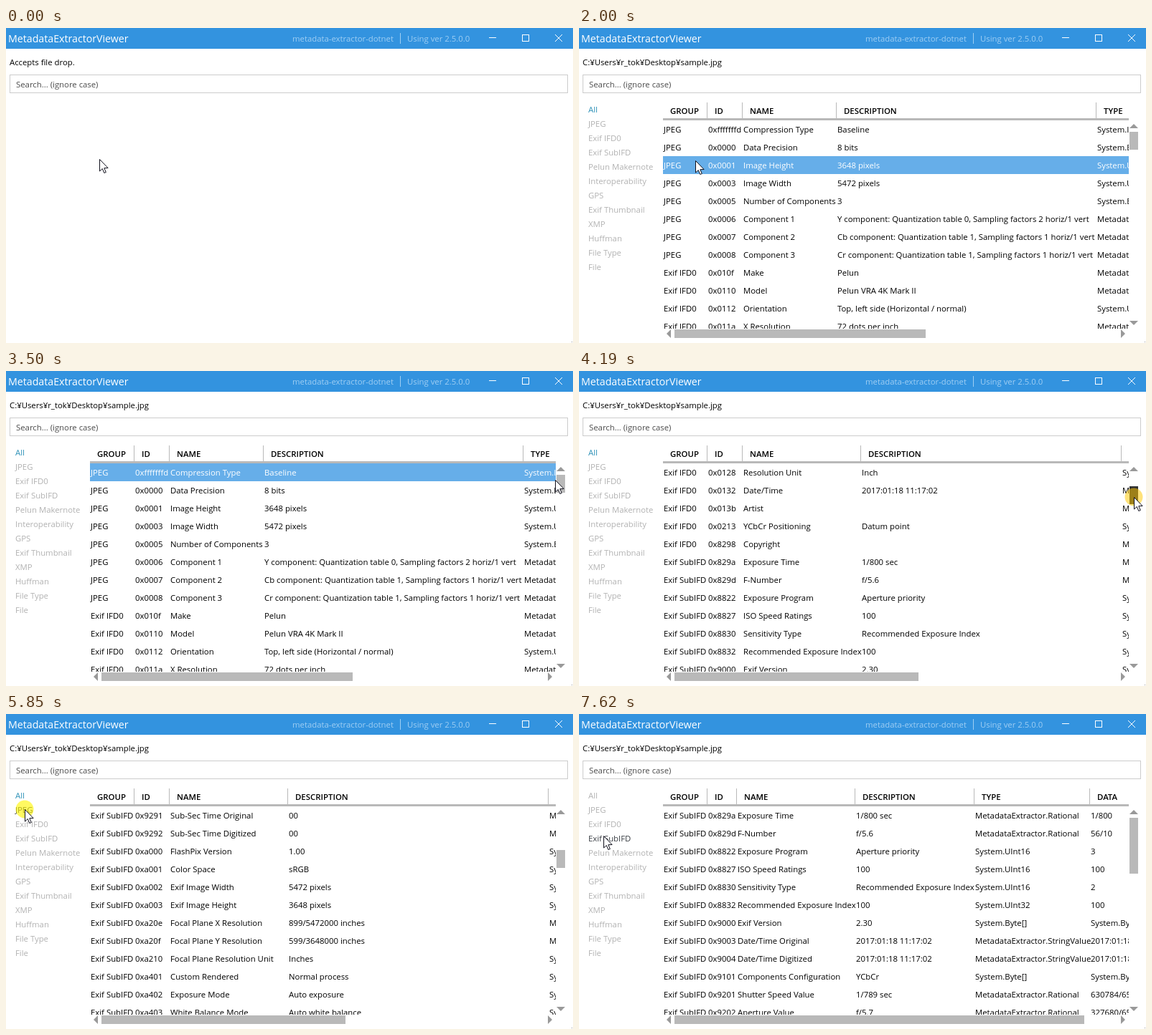
An HTML page with a canvas that plays this animation: 790 px wide and 440 px high, repeating every 8 s.

```html
<!DOCTYPE html>
<html lang="en">
<head>
<meta charset="utf-8">
<title>MetadataExtractorViewer</title>
<style>
html, body { margin: 0; width: 100%; height: 100%; overflow: hidden; background: #fff; }
canvas { display: block; }
</style>
</head>
<body>
<canvas id="stage" width="790" height="440"></canvas>
<script>
const ctx = document.getElementById('stage').getContext('2d', { alpha: false });
const LOOP = 8000;
const FAMILY = '"Open Sans", "Noto Sans", sans-serif';
const BODY = '11.35px ' + FAMILY;
const HEAD = '600 11.4px ' + FAMILY;
const TITLE = '14.2px ' + FAMILY;
const INK = '#000', GREY = '#b9b9b9', ACCENT = '#3393df';
const LEFT = 117, TOP = 129, BOTTOM = 420, ROW = 25;

const TABS = ['All', 'JPEG', 'Exif IFD0', 'Exif SubIFD', 'Pelun Makernote', 'Interoperability',
  'GPS', 'Exif Thumbnail', 'XMP', 'Huffman', 'File Type', 'File'];
const HEADERS = ['GROUP', 'ID', 'NAME', 'DESCRIPTION', 'TYPE', 'DATA'];
const TYPES = {
  i: 'System.Int32', b: 'System.Byte', u: 'System.UInt16', l: 'System.UInt32', a: 'System.Byte[]',
  r: 'MetadataExtractor.Rational', s: 'MetadataExtractor.StringValue',
  c: 'MetadataExtractor.Formats.Jpeg.JpegComponent'
};

// id | name | description | type key | data (falls back to the type, then the description)
const parse = (group, text) => text.trim().split('\n').map(line => {
  const [id, name, description, key, data] = line.split('|');
  const type = TYPES[key];
  return [group, '0x' + id, name, description, type, data || (key === 'a' ? type : description)];
});

const jpeg = parse('JPEG', `
fffffffd|Compression Type|Baseline|i|0
0000|Data Precision|8 bits|b|8
0001|Image Height|3648 pixels|u|3648
0003|Image Width|5472 pixels|u|5472
0005|Number of Components|3|b
0006|Component 1|Y component: Quantization table 0, Sampling factors 2 horiz/1 vert|c
0007|Component 2|Cb component: Quantization table 1, Sampling factors 1 horiz/1 vert|c
0008|Component 3|Cr component: Quantization table 1, Sampling factors 1 horiz/1 vert|c`);

const ifd0 = parse('Exif IFD0', `
010f|Make|Pelun|s
0110|Model|Pelun VRA 4K Mark II|s
0112|Orientation|Top, left side (Horizontal / normal)|u|1
011a|X Resolution|72 dots per inch|r|72/1
011b|Y Resolution|72 dots per inch|r|72/1
0128|Resolution Unit|Inch|u|2
0132|Date/Time|2017:01:18 11:17:02|s
013b|Artist||s
0213|YCbCr Positioning|Datum point|u|2
8298|Copyright||s`);

const subIfd = parse('Exif SubIFD', `
829a|Exposure Time|1/800 sec|r|1/800
829d|F-Number|f/5.6|r|56/10
8822|Exposure Program|Aperture priority|u|3
8827|ISO Speed Ratings|100|u
8830|Sensitivity Type|Recommended Exposure Index|u|2
8832|Recommended Exposure Index|100|l
9000|Exif Version|2.30|a
9003|Date/Time Original|2017:01:18 11:17:02|s
9004|Date/Time Digitized|2017:01:18 11:17:02|s
9101|Components Configuration|YCbCr|a
9201|Shutter Speed Value|1/789 sec|r|630784/65536
9202|Aperture Value|f/5.7|r|327680/65536
9204|Exposure Bias Value|0 EV|r|0/1
9207|Metering Mode|Multi-segment|u|5
9209|Flash|Flash did not fire|u|16
920a|Focal Length|18 mm|r|18/1
9286|User Comment||a
9290|Sub-Sec Time|00|s
9291|Sub-Sec Time Original|00|s
9292|Sub-Sec Time Digitized|00|s
a000|FlashPix Version|1.00|a
a001|Color Space|sRGB|u|1
a002|Exif Image Width|5472 pixels|u|5472
a003|Exif Image Height|3648 pixels|u|3648
a20e|Focal Plane X Resolution|899/5472000 inches|r
a20f|Focal Plane Y Resolution|599/3648000 inches|r
a210|Focal Plane Resolution Unit|Inches|u|2
a401|Custom Rendered|Normal process|u|0
a402|Exposure Mode|Auto exposure|u|0
a403|White Balance Mode|Auto white balance|u|0
a406|Scene Capture Type|Standard|u|0`);

const all = [...jpeg, ...ifd0, ...subIfd];

// seps: column edges; extent: full table width; thumb: vertical thumb height
const VIEWS = {
  all: { tab: 0, rows: all, seps: [178, 227, 358, 720], extent: 1150, thumb: 25 },
  allWide: { tab: 0, rows: all, seps: [178, 227, 392, 755], extent: 1184, thumb: 25 },
  jpeg: { tab: 1, rows: jpeg, seps: [178, 227, 358, 720], extent: 1150 },
  ifd0: { tab: 2, rows: ifd0, seps: [178, 219, 320, 503, 664], extent: 655 },
  subIfd: { tab: 3, rows: subIfd, seps: [178, 219, 384, 550, 711], extent: 705, thumb: 78 }
};

// The screen is refreshed in bursts: [first, last, count]
const BURSTS = [[0, 0, 1], [70, 130, 2], [790, 790, 1], [990, 1130, 3], [1330, 1330, 1], [1790, 2000, 4],
  [2460, 3220, 11], [3290, 4050, 11], [4120, 4910, 12], [4980, 5670, 11], [5850, 5920, 2],
  [6250, 6660, 6], [7070, 7620, 7]];
const TICKS = BURSTS.flatMap(([first, last, count]) =>
  Array.from({ length: count }, (_, i) => first + (count > 1 ? (last - first) * i / (count - 1) : 0)));

// Pointer path: time, x, y
const PATH = [[0, 130, 183], [70, 57, 217], [130, 20, 238], [990, 20, 238], [1060, 95, 200], [1130, 153, 171],
  [1330, 166, 187], [1789, 166, 187], [1790, 162, 185], [2400, 162, 185], [2840, 237, 312], [3220, 700, 168],
  [3290, 738, 153], [3440, 765, 152], [3660, 773, 159], [3760, 773, 159], [4620, 773, 199], [4900, 773, 204],
  [4920, 773, 204], [5660, 26, 133], [6180, 26, 133], [6410, 29, 152], [7000, 29, 152], [7340, 34, 170],
  [LOOP, 34, 170]];

const within = (t, a, b) => t >= a && t < b;

function pointerAt(t) {
  const i = Math.max(1, PATH.findIndex(p => p[0] >= t));
  const [t0, x0, y0] = PATH[i - 1], [t1, x1, y1] = PATH[i];
  const k = (t - t0) / (t1 - t0);
  return { x: Math.round(x0 + (x1 - x0) * k), y: Math.round(y0 + (y1 - y0) * k) };
}

function viewAt(t, scroll) {
  if (t < 1855) return null;
  if (t < 5915) return scroll >= 13 ? VIEWS.allWide : VIEWS.all;
  if (t < 6575) return VIEWS.jpeg;
  return t < 7525 ? VIEWS.ifd0 : VIEWS.subIfd;
}

function box(x, y, w, h, color) {
  ctx.fillStyle = color;
  ctx.fillRect(x, y, w, h);
}

function text(value, x, y, color = INK, font = BODY) {
  ctx.font = font;
  ctx.fillStyle = color;
  ctx.fillText(value, x, y);
}

function shape(points, fill, stroke) {
  ctx.beginPath();
  points.forEach(([x, y]) => ctx.lineTo(x, y));
  ctx.closePath();
  ctx.fillStyle = fill;
  ctx.fill();
  if (stroke) {
    ctx.strokeStyle = stroke;
    ctx.stroke();
  }
}

function drawTitleBar(active) {
  box(0, 0, 790, 29, active ? ACCENT : '#808080');
  text('MetadataExtractorViewer', 3, 20, '#fff', TITLE);
  const dim = active ? '#9fcef3' : '#c4c4c4';
  text('metadata-extractor-dotnet', 399, 19, dim);
  box(549, 7, 1, 15, dim);
  text('Using ver 2.5.0.0', 559, 19, dim);
  box(673, 13, 10, 1, '#fff');
  ctx.strokeStyle = '#fff';
  ctx.strokeRect(719.5, 9.5, 9, 9);
  ctx.beginPath();
  ctx.moveTo(765, 9);
  ctx.lineTo(775, 19);
  ctx.moveTo(775, 9);
  ctx.lineTo(765, 19);
  ctx.stroke();
}

function drawTabs(selected, pointer) {
  TABS.forEach((name, i) => {
    const hover = pointer.x < 112 && Math.floor((pointer.y - 104) / 20) === i;
    text(name, 13, 118 + 20 * i, hover ? '#3c4046' : i === selected ? '#2f92b8' : '#b2b2b2');
  });
}

function drawScrollBars(view, right, scroll, pressed) {
  const arrow = '#999';
  if (view.thumb) {
    shape([[767, 140], [773, 134], [779, 140]], arrow);
    shape([[767, 409], [773, 415], [779, 409]], arrow);
    box(767, 145 + Math.round(scroll * 1.25), 12, view.thumb, pressed ? '#333' : GREY);
  }
  if (view.extent > right - LEFT) {
    const track = right - 146;
    shape([[128, 421], [122, 427], [128, 433]], arrow);
    shape([[right - 11, 421], [right - 5, 427], [right - 11, 433]], arrow);
    box(133, 421, Math.round(track * (right - LEFT) / view.extent), 12, GREY);
  }
}

function drawTable(view, right, scroll, hoverRow) {
  ctx.save();
  ctx.beginPath();
  ctx.rect(LEFT, 104, right - LEFT, BOTTOM - 104);
  ctx.clip();
  box(LEFT, 126, right - LEFT, 3, GREY);
  view.seps.forEach(x => box(x, 104, 1, 22, GREY));
  const edges = [116, ...view.seps];
  edges.forEach((x, c) => text(HEADERS[c], x + 11, 120, INK, HEAD));
  view.rows.slice(scroll, scroll + 12).forEach((cells, r) => {
    const y = TOP + ROW * r;
    const lit = r === hoverRow;
    if (lit) box(LEFT, y, right - LEFT, ROW, '#66aee9');
    edges.forEach((x, c) => text(cells[c], x + 2, y + 17, lit ? '#fff' : INK));
  });
  ctx.restore();
}

function drawPointer({ x, y }) {
  const outline = [[0, 0], [0, 16.5], [3.8, 13], [6.3, 19], [8.8, 18], [6.3, 12.2], [11.6, 12]];
  shape(outline.map(([dx, dy]) => [x + dx + 0.5, y + dy + 0.5]), '#fff', '#10101c');
}

function drawClick({ x, y }, color) {
  ctx.beginPath();
  ctx.arc(x, y, 12.5, 0, Math.PI * 2);
  ctx.fillStyle = color;
  ctx.fill();
}

function draw(t) {
  const pointer = pointerAt(t);
  const dragging = within(t, 3660, 4950);
  const scroll = Math.round(36 * Math.min(1, Math.max(0, t < 4620
    ? (t - 3760) / 860 * 32 / 36
    : (32 + (t - 4620) / 280 * 4) / 36)));
  const view = viewAt(t, scroll);

  box(0, 0, 790, 440, '#fff');
  drawTitleBar(!within(t, 790, 1125));
  text(t < 1790 ? 'Accepts file drop.' : 'C:¥Users¥r_tok¥Desktop¥sample.jpg', 5, 52);
  ctx.strokeStyle = '#ccc';
  ctx.strokeRect(5.5, 65.5, 777, 25);
  text('Search... (ignore case)', 14, 83, '#4c4c4c');
  box(788, 438, 1, 1, '#999');

  if (view) {
    const right = view.thumb ? 766 : 780;
    const inside = pointer.x >= LEFT && pointer.x < right && pointer.y >= TOP && t >= 1925;
    drawTabs(view.tab, pointer);
    drawTable(view, right, view.tab ? 0 : scroll, inside ? Math.floor((pointer.y - TOP) / ROW) : -1);
    drawScrollBars(view, right, view.tab ? 0 : scroll, dragging);
  }

  if (dragging) drawClick(pointer, 'rgba(255,200,0,.52)');
  const clicked = within(t, 5850, 5915) || within(t, 6490, 6655) || within(t, 7430, 7615);
  if (clicked) drawClick(pointer, 'rgba(255,245,0,.62)');
  if (!within(t, 130, 990)) drawPointer(pointer);
}

const start = performance.now();

function frame() {
  const t = (performance.now() - start) % LOOP;
  draw(TICKS.filter(tick => tick <= t + 0.5).pop());
  requestAnimationFrame(frame);
}

frame();
</script>
</body>
</html>
```
